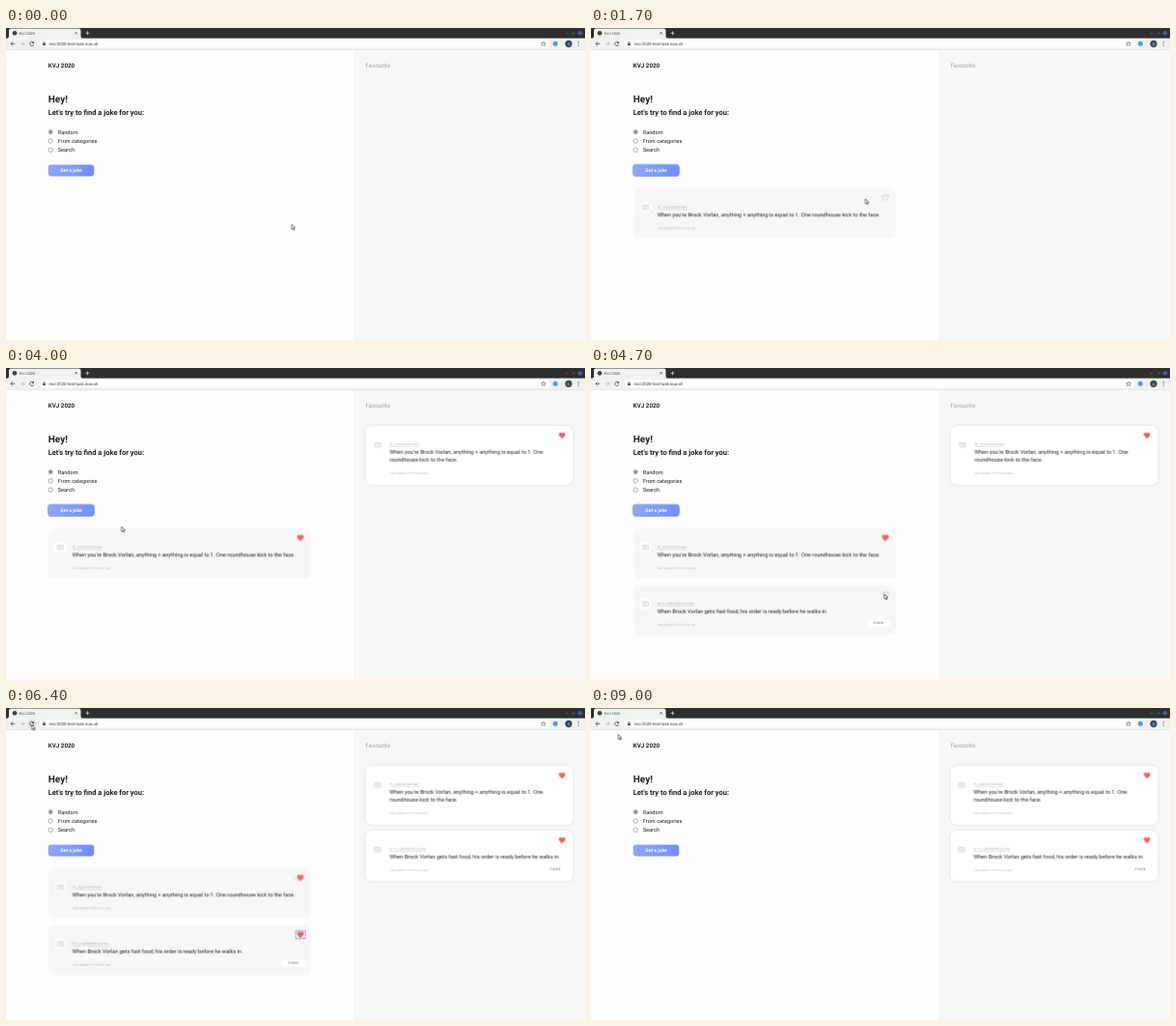
An HTML page that plays this animation: 600 by 323 pixels, repeating every 9100 ms.

```html
<!DOCTYPE html>
<html lang="en">
<head>
<meta charset="utf-8">
<title>KVJ 2020</title>
<style>
html, body { margin: 0; width: 100%; height: 100%; overflow: hidden; background: #fefefe; }
svg { display: block; width: 100%; height: 100%; }
text { font-family: Roboto, "Liberation Sans", sans-serif; text-rendering: geometricPrecision; fill: #1f2023; white-space: pre; }
.body { font-size: 5.625px; }
.bold { font-weight: 700; }
.id { font-size: 3.125px; fill: #a9a9a9; text-decoration: underline; }
.age { font-size: 3.125px; fill: #b4b4b4; }
.tag { font-size: 3.1px; font-weight: 500; letter-spacing: .7px; fill: #555; text-anchor: middle; }
.line { fill: none; stroke: #444; stroke-width: .75; }
.red { fill: #f95c62; stroke: #f95c62; }
.ring { fill: none; stroke: #7d9be0; stroke-width: .8; }
.fav > rect { filter: drop-shadow(0 .8px 1.2px rgba(0, 0, 0, .16)); }

/* Times are percentages of the 9100 ms loop. */
.t { animation: 9100ms step-end infinite; }
.press { animation-name: press; }
.card1 { animation-name: card1; }
.card2 { animation-name: card2; }
.like1 { animation-name: like1; }
.like2 { animation-name: like2; }
.focus1 { animation-name: focus1; }
.blank { animation-name: blank; }
.nudge { animation-name: nudge; }
.load { animation-name: load; }
.idle { animation-name: idle; }
.hover { animation-name: hover; }
.status { animation-name: status; }
.cursor { animation-name: cursor; }
.spin { animation: spin 800ms steps(8) infinite; }

@keyframes press {
  0%, 27.472%, 54.945%, 100% { opacity: 0; }
  9.89%, 38.461% { opacity: 1; }
}
@keyframes card1 { 0%, 74.725%, 100% { opacity: 0; } 13.186% { opacity: 1; } }
@keyframes card2 { 0%, 74.725%, 100% { opacity: 0; } 45.054% { opacity: 1; } }
@keyframes like1 { 0% { opacity: 0; } 27.472%, 100% { opacity: 1; } }
@keyframes like2 { 0% { opacity: 0; } 54.945%, 100% { opacity: 1; } }
@keyframes focus1 { 0%, 38.461%, 100% { opacity: 0; } 27.472% { opacity: 1; } }
@keyframes blank { 0%, 76.923%, 100% { opacity: 0; } 74.725% { opacity: 1; } }
@keyframes nudge { 0% { transform: none; } 74.725%, 100% { transform: translate(-1px, 0); } }
@keyframes load { 0%, 80.219%, 100% { opacity: 0; } 73.626% { opacity: 1; } }
@keyframes idle { 0%, 80.219%, 100% { opacity: 1; } 73.626% { opacity: 0; } }
@keyframes hover { 0%, 95.604%, 100% { opacity: 0; } 68.131% { opacity: 1; } }
@keyframes status {
  0%, 85.714%, 100% { opacity: 0; }
  73.626% { opacity: 1; }
  82.417% { opacity: .8; }
  83.516% { opacity: .55; }
  84.615% { opacity: .25; }
}
@keyframes spin { to { transform: rotate(360deg); } }
@keyframes cursor {
  0% { transform: translate(296px, 203.3px); animation-timing-function: steps(2); }
  2.197% { transform: translate(262px, 196px); animation-timing-function: steps(3); }
  5.494% { transform: translate(100px, 156px); animation-timing-function: steps(2); }
  7.692% { transform: translate(67px, 149.5px); }
  15.384% { transform: translate(67px, 149.5px); animation-timing-function: steps(2); }
  17.582% { transform: translate(228px, 180px); }
  18.681% { transform: translate(284.3px, 176.8px); animation-timing-function: steps(5); }
  24.175% { transform: translate(304.7px, 175px); }
  29.67% { transform: translate(304.7px, 175px); animation-timing-function: steps(2); }
  31.868% { transform: translate(262px, 171px); animation-timing-function: steps(2); }
  34.065% { transform: translate(120px, 152px); animation-timing-function: steps(2); }
  36.263% { transform: translate(78px, 146.6px); }
  40.659% { transform: translate(78px, 146.6px); animation-timing-function: steps(3); }
  43.956% { transform: translate(119.7px, 164.2px); animation-timing-function: steps(4); }
  48.351% { transform: translate(285px, 222px); }
  49.45% { transform: translate(310px, 238px); animation-timing-function: steps(2); }
  51.648% { transform: translate(304px, 234px); }
  56.043% { transform: translate(304px, 234px); animation-timing-function: steps(3); }
  59.34% { transform: translate(294.8px, 221.3px); animation-timing-function: steps(3); }
  62.637% { transform: translate(60px, 80px); }
  63.736% { transform: translate(5px, 38px); }
  64.835% { transform: translate(14.5px, 27.5px); animation-timing-function: steps(3); }
  68.131% { transform: translate(26.8px, 17.3px); }
  90.109% { transform: translate(26.8px, 17.3px); animation-timing-function: steps(8); }
  98.901%, 100% { transform: translate(28.2px, 27.3px); }
}
</style>
</head>
<body>
<svg viewBox="0 0 600 323" preserveAspectRatio="none">
  <defs>
    <linearGradient id="blue">
      <stop offset="0" stop-color="#8ea5ff"/>
      <stop offset="1" stop-color="#6f90fb"/>
    </linearGradient>
    <path id="heart" d="M0 2.9C-1.6 1.6-3.1.4-3.1-1.1C-3.1-3-.9-3.3 0-1.7C.9-3.3 3.1-3 3.1-1.1C3.1.4 1.6 1.6 0 2.9Z" stroke-width=".6"/>
    <g id="note">
      <circle r="6.2" fill="#fff"/>
      <path d="M-3-2.2H3V2.1H.9L0 3L-.9 2.1H-3ZM-1.5-.8H1.5M-1.5.6H1.5" fill="none" stroke="#bcbcbc" stroke-width=".6"/>
    </g>
  </defs>

  <!-- page -->
  <rect width="600" height="323" fill="#fefefe"/>
  <rect x="360" y="23" width="240" height="300" fill="#f7f7f7"/>
  <text class="bold" x="43.75" y="41" font-size="6.25">KVJ 2020</text>
  <text x="372.5" y="41" font-size="6.25" style="fill:#a4a4a4">Favourite</text>
  <text class="bold" x="43.75" y="77" font-size="10">Hey!</text>
  <text class="bold" x="43.75" y="90.2" font-size="7.5">Let's try to find a joke for you:</text>

  <g fill="#fff" stroke="#777" stroke-width=".6">
    <circle cx="46.2" cy="107.6" r="2.2"/>
    <circle cx="46.2" cy="116.9" r="2.2"/>
    <circle cx="46.2" cy="126.2" r="2.2"/>
  </g>
  <circle cx="46.2" cy="107.6" r="1.2" fill="#444"/>
  <text class="body" x="53.75" y="109.6">Random</text>
  <text class="body" x="53.75" y="118.9">From categories</text>
  <text class="body" x="53.75" y="128.1">Search</text>

  <rect x="43.75" y="141.5" width="47.5" height="11.9" rx="3.1" fill="url(#blue)"/>
  <rect class="ring t press" x="43.5" y="141.2" width="48" height="12.4" rx="3"/>
  <text class="bold" x="67.5" y="149.3" font-size="5" text-anchor="middle" style="fill:#fff">Get a joke</text>

  <!-- found jokes -->
  <g transform="translate(43.75 166.3)">
    <g class="t card1">
      <rect width="272.5" height="51.8" rx="6.2" fill="#f7f7f7"/>
      <use href="#note" x="12.7" y="19.3"/>
      <text class="id" x="25" y="20.2">ID: _zvb4ozdntbxzaale</text>
      <text class="body" x="25" y="28.5">When you're Brock Vorlan, anything + anything is equal to 1. One roundhouse kick to the face.</text>
      <text class="age" x="25" y="41.9">Last update: 2919 hours ago</text>
      <use href="#heart" x="261.3" y="9.5" fill="none" stroke="#aaa"/>
      <use class="red t like1" href="#heart" x="261.3" y="9.5"/>
      <rect class="ring t focus1" x="256.3" y="5.6" width="10" height="8"/>
    </g>
  </g>
  <g transform="translate(43.75 224.8)">
    <g class="t card2">
      <rect width="272.5" height="51.8" rx="6.2" fill="#f7f7f7"/>
      <use href="#note" x="12.7" y="19.3"/>
      <text class="id" x="25" y="20.2">ID: 6_nvqdb4fgtdbhqztxsda</text>
      <text class="body" x="25" y="28.5">When Brock Vorlan gets fast food, his order is ready before he walks in.</text>
      <text class="age" x="25" y="41.9">Last update: 2919 hours ago</text>
      <rect x="242" y="35.7" width="24.5" height="7.2" rx="3" fill="#fff"/>
      <text class="tag" x="254.5" y="40.4">FOOD</text>
      <use href="#heart" x="261.3" y="9.8" fill="none" stroke="#aaa"/>
      <g class="t like2">
        <use class="red" href="#heart" x="261.3" y="9.8"/>
        <rect class="ring" x="256.3" y="5.9" width="10" height="8"/>
      </g>
    </g>
  </g>

  <!-- favourites -->
  <g transform="translate(372.5 59.8)">
    <g class="fav t like1">
      <rect width="215" height="61" rx="6.2" fill="#fff"/>
      <g class="t nudge">
        <use href="#note" x="12.7" y="19.8"/>
        <text class="id" x="25" y="20.2">ID: _zvb4ozdntbxzaale</text>
        <text class="body" x="25" y="28.8">When you're Brock Vorlan, anything + anything is equal to 1. One</text>
        <text class="body" x="25" y="37.2">roundhouse kick to the face.</text>
        <text class="age" x="25" y="50.4">Last update: 2919 hours ago</text>
      </g>
      <use class="red" href="#heart" x="203.7" y="10"/>
    </g>
  </g>
  <g transform="translate(372.5 126.8)">
    <g class="fav t like2">
      <rect width="215" height="52.6" rx="6.2" fill="#fff"/>
      <g class="t nudge">
        <use href="#note" x="12.7" y="19.8"/>
        <text class="id" x="25" y="20.2">ID: 6_nvqdb4fgtdbhqztxsda</text>
        <text class="body" x="25" y="28.8">When Brock Vorlan gets fast food, his order is ready before he walks in.</text>
        <text class="age" x="25" y="42.3">Last update: 2919 hours ago</text>
      </g>
      <text class="tag" x="197" y="40.6">FOOD</text>
      <use class="red" href="#heart" x="203.7" y="10"/>
    </g>
  </g>

  <rect class="t blank" y="23" width="600" height="300" fill="#fefefe"/>
  <g class="t status">
    <path d="M0 317H198Q200 317 200 319V323H0Z" fill="#ededed"/>
    <text x="1.5" y="321.4" font-size="3.75" style="fill:#777">Waiting for msi-2020-test-task.now.sh...</text>
  </g>

  <!-- browser -->
  <rect width="600" height="11" fill="#2e2e2e"/>
  <path d="M1 11Q3 11 3 8V2.5Q3 .5 5 .5H75.5Q77.5 .5 77.5 2.5V8Q77.5 11 80 11Z" fill="#f1f1f0"/>
  <rect y="10.6" width="600" height="12" fill="#f1f1f0"/>
  <rect y="22.4" width="600" height=".6" fill="#dcdcdb"/>
  <circle class="t idle" cx="9" cy="5.3" r="2.4" fill="#444"/>
  <g transform="translate(9 5.3)">
    <g class="t load"><path class="spin line" d="M0-2.1A2.1 2.1 0 1 1-2.1 0"/></g>
  </g>
  <text x="13.8" y="6.7" font-size="3.75" style="fill:#444">KVJ 2020</text>
  <path class="line" d="M71.5 4.2L73.7 6.4M73.7 4.2L71.5 6.4" stroke-width=".6"/>
  <path class="line" d="M82.6 5.3H86.4M84.5 3.4V7.2" style="stroke:#ddd"/>
  <path class="line" d="M579.8 5.6H582M587 6.2L588.2 4.8L589.4 6.2" style="stroke:#777"/>
  <circle cx="595" cy="5.3" r="2.4" fill="#4658a8"/>

  <path class="line" d="M9.2 16.3H5M7 14.2L4.9 16.3L7 18.4"/>
  <path class="line" d="M14.8 16.3H19M17 14.2L19.1 16.3L17 18.4" style="stroke:#b4b4b4"/>
  <circle class="t hover" cx="26.8" cy="16.3" r="4.4" fill="#e2e2e1"/>
  <g class="t idle">
    <path class="line" d="M28.4 15A2.1 2.1 0 1 0 28.8 17"/>
    <path d="M29 13.8V16H26.8Z" fill="#444"/>
  </g>
  <path class="line t load" d="M25.1 14.6L28.5 18M28.5 14.6L25.1 18"/>

  <rect x="34.5" y="12.1" width="530" height="8.5" rx="4.2" fill="#fff"/>
  <rect x="38.1" y="15.8" width="2.8" height="2.2" rx=".3" fill="#555"/>
  <path class="line" d="M38.7 16V15.2A.8 .8 0 0 1 40.3 15.2V16" style="stroke-width:.5"/>
  <text x="44.4" y="17.8" font-size="4.375" style="fill:#333">msi-2020-test-task.now.sh</text>
  <path class="line" d="M557 14L557.7 15.6L559.4 15.7L558.1 16.8L558.5 18.5L557 17.6L555.5 18.5L555.9 16.8L554.6 15.7L556.3 15.6Z" style="stroke-width:.5"/>
  <circle cx="569.3" cy="16.3" r="2.5" fill="#42a0e4"/>
  <rect x="575.8" y="13.8" width=".4" height="5" fill="#d0d0d0"/>
  <circle cx="583" cy="16.3" r="3.6" fill="#354a5c"/>
  <text x="583" y="17.5" font-size="3.4" text-anchor="middle" style="fill:#dde3e8">K</text>
  <g fill="#444">
    <circle cx="593.2" cy="14.4" r=".55"/>
    <circle cx="593.2" cy="16.3" r=".55"/>
    <circle cx="593.2" cy="18.2" r=".55"/>
  </g>

  <path class="t cursor" d="M0 0V5.1L1.2 4.1L2 5.9L2.9 5.5L2.1 3.8H3.7Z" fill="#fff" stroke="#222" stroke-width=".6" stroke-linejoin="round"/>
</svg>
</body>
</html>
```
